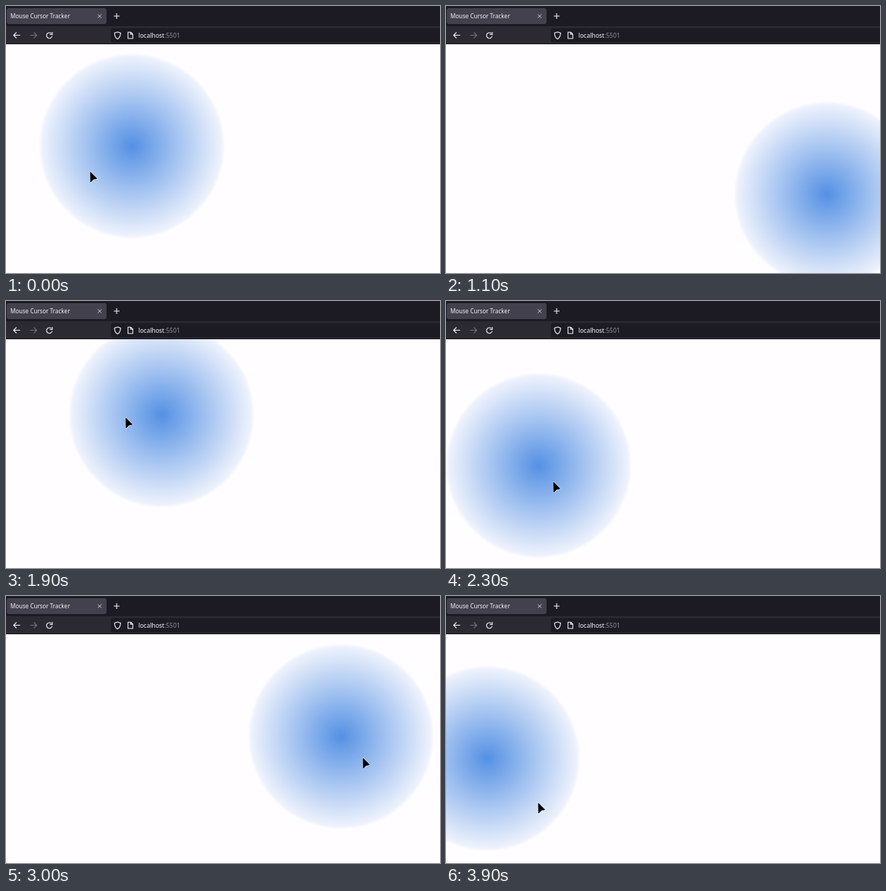
An HTML page with a canvas for the animation above (4000 ms loop, 600 by 370 pixels).

```html
<!DOCTYPE html>
<html lang="en">
<head>
<meta charset="utf-8">
<title>Mouse Cursor Tracker</title>
<style>
html, body { margin: 0; width: 100%; height: 100%; overflow: hidden; background: #fffdff; }
canvas { display: block; }
</style>
</head>
<body>
<canvas id="stage" width="600" height="370"></canvas>
<script>
const ctx = document.getElementById('stage').getContext('2d');
const LOOP = 4000, STEP = 100, LAG = 140, RADIUS = 129;
const FONT = '"Noto Sans", "Open Sans", sans-serif';

// The glow chases the pointer: its velocity is (pointer - glow) / LAG.
const keys = [
  { t: 0, glow: [174, 194], pointer: [116, 229] },
  { t: 700, glow: [300, 254], pointer: [354, 222] },
  { t: 1500, glow: [553, 286], pointer: [467, 267] },
  { t: 1900, glow: [215, 158], pointer: [165, 161] },
  { t: 2300, glow: [128, 228], pointer: [148, 250] },
  { t: 2700, glow: [339, 191], pointer: [415, 145] },
  { t: 3400, glow: [349, 202], pointer: [221, 142] },
  { t: 3900, glow: [57, 225], pointer: [127, 286] }
];

// Cubic Hermite for the glow; its derivative leads to the pointer.
function poseAt(t) {
  const next = Math.max(1, keys.findIndex(key => key.t >= t));
  const a = keys[next - 1], b = keys[next], span = b.t - a.t;
  const u = (t - a.t) / span, v = 1 - u;
  const pose = { glow: [], pointer: [] };
  for (const axis of [0, 1]) {
    const p = a.glow[axis], q = b.glow[axis];
    const m = (a.pointer[axis] - p) * span / LAG;
    const n = (b.pointer[axis] - q) * span / LAG;
    const position = p * (1 + 2 * u) * v * v + q * u * u * (3 - 2 * u) + u * v * (v * m - u * n);
    const velocity = (6 * u * v * (q - p) + v * (1 - 3 * u) * m + u * (3 * u - 2) * n) / span;
    pose.glow.push(position);
    pose.pointer.push(position + LAG * velocity);
  }
  return pose;
}

function rect(x, y, w, h, color, radius = 0) {
  ctx.fillStyle = color;
  ctx.beginPath();
  ctx.roundRect(x, y, w, h, radius);
  ctx.fill();
}

function stroke(shape, color = '#f4f3f7', width = 1.1) {
  ctx.strokeStyle = color;
  ctx.lineWidth = width;
  ctx.stroke(new Path2D(shape));
}

function label(text, x, y, size, color) {
  ctx.font = `500 ${size}px ${FONT}`;
  ctx.fillStyle = color;
  ctx.fillText(text, x, y);
}

function drawBrowser() {
  rect(0, 0, 600, 28, '#1c1b24');
  rect(1, 3, 138, 22, '#42414d', 3);
  label('Mouse Cursor Tracker', 6, 17, 8, '#f4f3f7');
  stroke('M127 11.5l5 5m0-5l-5 5', '#e2e1e8', 0.9);
  stroke('M149 14h8m-4-4v8');

  rect(0, 28, 600, 25, '#2b2a33');
  rect(0, 52, 600, 1, '#15141b');
  rect(145, 30.5, 460, 20, '#1c1b24', 3);
  stroke('M19.5 40.5h-9m4-4l-4 4l4 4');
  stroke('M33.5 40.5h9m-4-4l4 4l-4 4', '#72717b');
  stroke('M62.8 38.2A3.9 3.9 0 1 0 63.8 41.5M64 36v3.5h-3.5');
  stroke('M154.2 36l4.2 1.5c0 4-1 6.3-4.2 8.3c-3.2-2-4.2-4.3-4.2-8.3z');
  stroke('M168.7 36.2h3.8l2.8 2.8v6h-6.6zM172.3 36.2v3h3');
  label('localhost', 183, 43.5, 8.5, '#fbfbfe');
  const hostWidth = ctx.measureText('localhost').width;
  label(':5501', 183 + hostWidth, 43.5, 8.5, '#92919b');
}

function drawGlow([x, y]) {
  const glow = ctx.createRadialGradient(x, y, 0, x, y, RADIUS);
  const stop = (at, alpha) => glow.addColorStop(at, `rgba(79,141,227,${alpha})`);
  stop(0, 0.97);
  stop(0.5, 0.51);
  stop(0.96, 0.1);
  stop(1, 0);
  ctx.fillStyle = glow;
  ctx.fillRect(x - RADIUS, y - RADIUS, RADIUS * 2, RADIUS * 2);
}

function drawPointer([x, y]) {
  const arrow = 'M.9 1.4L9.4 10L4.8 10.9L1.1 14.8Z';
  ctx.save();
  ctx.translate(x, y);
  ctx.lineJoin = 'round';
  stroke(arrow, 'rgba(255,255,255,.4)', 2.6);
  stroke(arrow, '#000', 1);
  ctx.fillStyle = '#000';
  ctx.fill(new Path2D(arrow));
  ctx.restore();
}

function draw(now) {
  const t = Math.floor((now % LOOP) / STEP) * STEP;
  const { glow, pointer } = poseAt(t);
  rect(0, 0, 600, 370, '#fffdff');
  drawGlow(glow);
  drawBrowser();
  drawPointer(pointer);
}

const start = performance.now();
function tick() {
  draw(performance.now() - start);
  requestAnimationFrame(tick);
}
tick();
</script>
</body>
</html>
```
